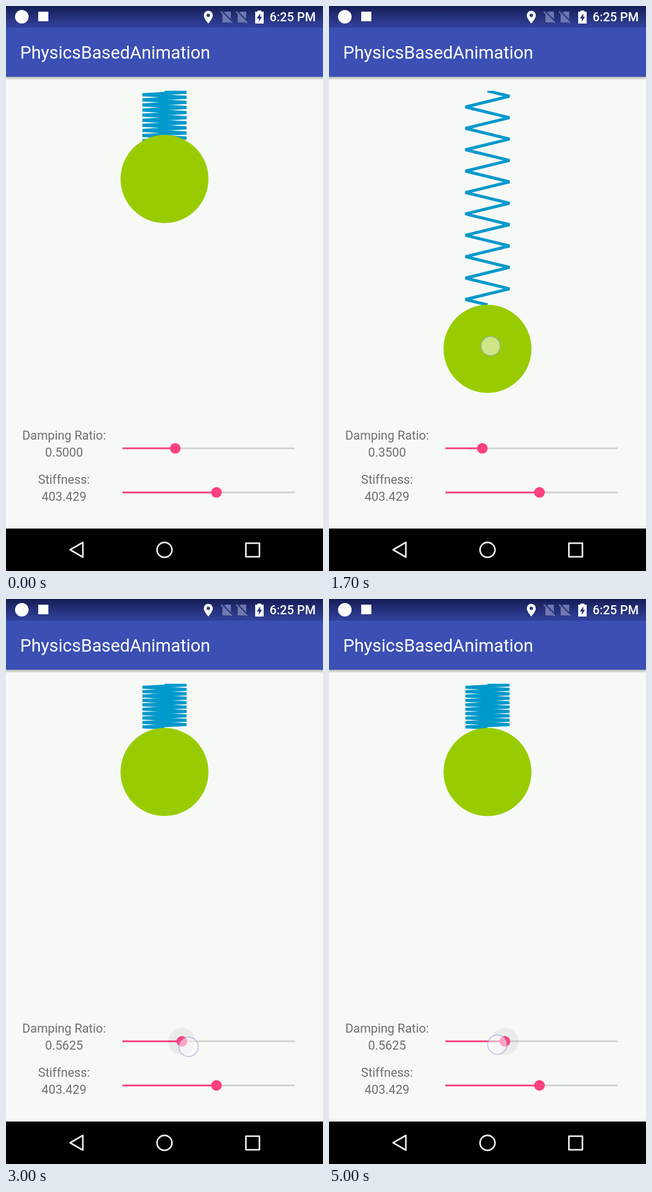
An HTML page with a canvas for the animation above (5100 ms loop, 561 by 998 pixels).

```html
<!DOCTYPE html>
<html lang="en">
<head>
<meta charset="utf-8">
<title>Spring demo</title>
<style>
  html, body { margin: 0; width: 100%; height: 100%; overflow: hidden; background: #f7f9f6; }
  canvas { display: block; width: 561px; height: 998px; }
</style>
</head>
<body>
<canvas id="stage" width="561" height="998"></canvas>
<script>
const ctx = document.getElementById('stage').getContext('2d');
const LOOP = 5100, STEP = 100;
const W = 561, H = 998, CX = 280.5;
const FONT = 'Roboto, "Open Sans", sans-serif';
const PINK = '#ff4081', GREEN = '#99cc00', BLUE = '#0099cc';
const STIFFNESS = 403.429;
const REST = 305.6, RADIUS = 77.8, TOP = 150;
const TRACK_L = 206, TRACK_R = 511;

// Ball drags: finger down, pull start, pull end, release
const drags = [
  { down: 1400, start: 1450, end: 1700, up: 1774, pull: 300, damping: 0.35, x: 286 },
  { down: 3400, start: 3450, end: 3750, up: 3810, pull: 231, damping: 0.7125, x: 290 }
];

// Slider drags: finger x over time
const slides = [
  { y: 789, up: 1050, keys: [[500, 299], [850, 272]] },
  { y: 791, up: 3300, keys: [[2800, 274], [3000, 323], [3150, 341]] },
  { y: 787, up: LOOP, keys: [[4700, 340], [5000, 298]] }
];

const dampingKeys = [
  [500, 0.5], [900, 0.35], [2800, 0.35], [3000, 0.5625],
  [3200, 0.7125], [4700, 0.7125], [5000, 0.5625]
];

const clamp = (v, a = 0, b = 1) => Math.min(b, Math.max(a, v));
const smooth = p => p * p * (3 - 2 * p);

function along(keys, t) {
  if (t <= keys[0][0]) return keys[0][1];
  for (let i = 1; i < keys.length; i++) {
    const [t0, a] = keys[i - 1], [t1, b] = keys[i];
    if (t <= t1) return a + (b - a) * (t - t0) / (t1 - t0);
  }
  return keys[keys.length - 1][1];
}

function springBack(pull, damping, s) {
  const w = Math.sqrt(STIFFNESS), r = Math.sqrt(1 - damping * damping);
  const a = w * r * s;
  return pull * Math.exp(-damping * w * s) * (Math.cos(a) + damping / r * Math.sin(a));
}

function offsetAt(t) {
  const d = drags.filter(g => t >= g.down).pop();
  if (!d) return 0;
  if (t < d.up) return d.pull * smooth(clamp((t - d.start) / (d.end - d.start)));
  return springBack(d.pull, d.damping, (t - d.up) / 1000);
}

function poly(points, close) {
  ctx.beginPath();
  points.forEach(([x, y]) => ctx.lineTo(x, y));
  if (close) ctx.closePath();
}

function disc(x, y, r, color) {
  ctx.beginPath();
  ctx.arc(x, y, r, 0, Math.PI * 2);
  ctx.fillStyle = color;
  ctx.fill();
}

function box(x, y, w, h, color) {
  ctx.fillStyle = color;
  ctx.fillRect(x, y, w, h);
}

function line(x0, y0, x1, y1, width, color) {
  poly([[x0, y0], [x1, y1]]);
  ctx.lineWidth = width;
  ctx.strokeStyle = color;
  ctx.stroke();
}

function text(str, x, y, size, color, align = 'left', weight = 400) {
  ctx.font = `${weight} ${size}px ${FONT}`;
  ctx.textAlign = align;
  ctx.fillStyle = color;
  ctx.fillText(str, x, y);
}

function fade(y0, y1, from, to) {
  const g = ctx.createLinearGradient(0, y0, 0, y1);
  g.addColorStop(0, from);
  g.addColorStop(1, to);
  return g;
}

function noSim(x) {
  const gray = '#6f78ae';
  poly([[x + 8, 10], [x + 18, 10], [x + 18, 29], [x + 3, 29], [x + 3, 15]], true);
  ctx.fillStyle = gray;
  ctx.fill();
  line(x + 2, 9, x + 21, 28, 2.5, '#2c3785');
  line(x, 10, x + 20, 30, 2, gray);
}

function statusBar() {
  box(0, 0, W, 38, fade(0, 34, '#151d55', '#303f96'));
  disc(28, 19, 12, '#fff');
  box(57, 10, 18, 17, '#fff');

  ctx.beginPath();
  ctx.moveTo(358, 31);
  ctx.bezierCurveTo(353, 25, 350, 20, 350, 16.5);
  ctx.arc(358, 16.5, 8, Math.PI, 0);
  ctx.bezierCurveTo(366, 20, 363, 25, 358, 31);
  ctx.fillStyle = '#fff';
  ctx.fill();
  disc(358, 16.5, 3, '#2b3782');

  noSim(380);
  noSim(407);

  box(441, 10, 15, 21, '#fff');
  box(445, 8, 7, 3, '#fff');
  poly([[450, 13], [444, 22], [447.5, 22], [447.5, 28], [453, 19], [450, 19]], true);
  ctx.fillStyle = '#2b3782';
  ctx.fill();

  text('6:25 PM', 548, 27, 21.8, '#fff', 'right', 500);
}

function appBar() {
  box(0, 125, W, 6, fade(125, 131, 'rgba(0,0,0,.28)', 'rgba(0,0,0,0)'));
  box(0, 37.5, W, 87.5, '#3b4fb4');
  text('PhysicsBasedAnimation', 25, 93, 31.2, '#fff');
}

function navBar() {
  box(0, 923, W, H - 923, '#000');
  ctx.strokeStyle = '#f0f0f0';
  ctx.lineWidth = 2.8;
  ctx.lineJoin = 'round';
  poly([[113.5, 960.5], [136, 947.5], [136, 973.5]], true);
  ctx.stroke();
  ctx.beginPath();
  ctx.arc(CX, 960.7, 13.2, 0, Math.PI * 2);
  ctx.stroke();
  ctx.strokeRect(424.5, 948.8, 24, 24);
}

function coil(length) {
  const pitch = length / 10, points = [[CX, TOP]];
  for (let i = 0; i < 20; i++) {
    points.push([CX + (i % 2 ? -39 : 39), TOP + (i + 0.5) * pitch / 2]);
  }
  points.push([CX, TOP + length]);
  ctx.save();
  ctx.beginPath();
  ctx.rect(0, 149.7, W, 780);
  ctx.clip();
  poly(points);
  ctx.lineJoin = 'bevel';
  ctx.lineWidth = 5.3;
  ctx.strokeStyle = BLUE;
  ctx.stroke();
  ctx.restore();
}

function slider(y, x, pressed) {
  line(TRACK_L, y, TRACK_R, y, 3, '#d0d2cf');
  line(TRACK_L, y, x, y, 3, PINK);
  if (pressed) disc(x, y, 24, 'rgba(0,0,0,.05)');
  disc(x, y, 9.4, PINK);
}

function label(name, value, y) {
  text(name, 102.7, y, 21.8, '#6f706e', 'center');
  text(value, 102.7, y + 30, 21.8, '#6f706e', 'center');
}

function touch(x, y) {
  disc(x, y, 17, 'rgba(255,255,255,.52)');
  ctx.beginPath();
  ctx.arc(x, y, 17, 0, Math.PI * 2);
  ctx.lineWidth = 2;
  ctx.strokeStyle = 'rgba(130,140,205,.45)';
  ctx.stroke();
}

function draw(t) {
  const offset = offsetAt(t), ballY = REST + offset;
  const damping = Math.round(along(dampingKeys, t) / 0.0125) * 0.0125;
  const slide = slides.find(s => t >= s.keys[0][0] && t < s.up);
  const drag = drags.find(d => t >= d.down && t < d.up);

  box(0, 0, W, H, '#f7f9f6');
  coil(t < drags[0].down ? 90 : ballY - RADIUS - TOP);
  disc(CX, ballY, RADIUS, GREEN);

  label('Damping Ratio:', damping.toFixed(4), 766);
  label('Stiffness:', STIFFNESS.toFixed(3), 844);
  slider(781.3, 205.65 + damping * 187.7, !!slide);
  slider(859.2, 372.5, false);

  appBar();
  statusBar();
  navBar();

  if (slide) touch(along(slide.keys, t), slide.y);
  if (drag) touch(drag.x, ballY - 5);
}

function tick() {
  const t = performance.now() % LOOP;
  draw(Math.floor(t / STEP) * STEP);
  requestAnimationFrame(tick);
}
tick();
</script>
</body>
</html>
```
